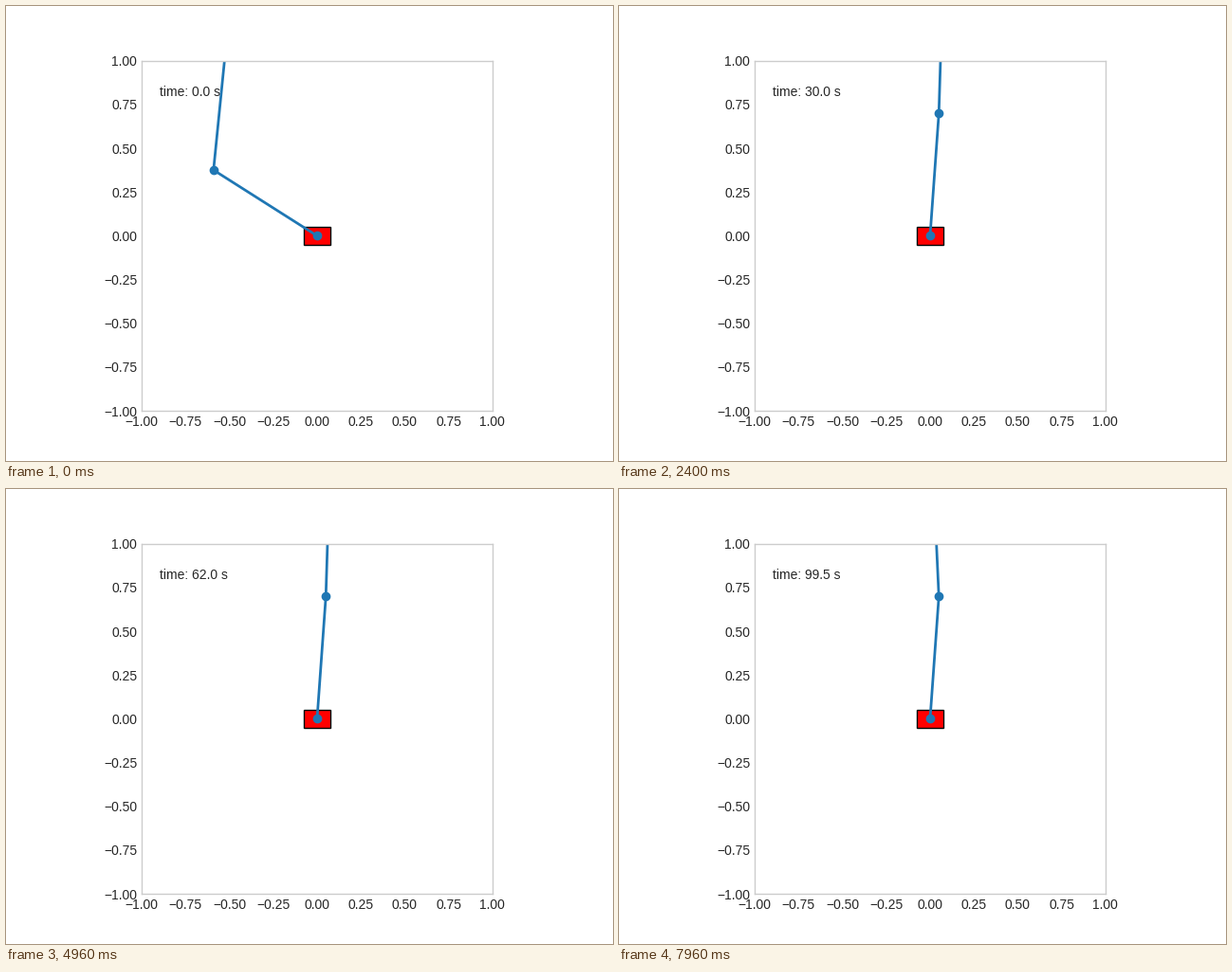
A matplotlib script that plays this animation: 640x480 px, repeating every 8 s.

```python
import numpy as np
import matplotlib.pyplot as plt
from matplotlib.animation import FuncAnimation
from matplotlib.patches import Rectangle

FRAMES, INTERVAL = 200, 40
DT = 0.5
LINK = 0.7
SETTLED = 46

plt.rcParams.update({
    "font.family": "Liberation Sans",
    "font.size": 10,
    "text.color": "0.15",
    "xtick.color": "0.15",
    "ytick.color": "0.15",
    "axes.edgecolor": "0.8",
    "axes.linewidth": 1.0,
    "xtick.major.size": 0,
    "ytick.major.size": 0,
    "lines.solid_capstyle": "round",
})

fig = plt.figure(figsize=(6.4, 4.8), dpi=100, facecolor="white")
ax = fig.add_subplot(aspect="equal", xlim=(-1, 1), ylim=(-1, 1))
ax.set_xticks(np.linspace(-1, 1, 9))
ax.set_yticks(np.linspace(-1, 1, 9))

ax.add_patch(Rectangle((-0.075, -0.05), 0.15, 0.1, fc="red", ec="black", lw=1))
arm, = ax.plot([], [], "o-", color="#1f77b4", lw=2, ms=6)
clock = ax.text(0.05, 0.9, "", transform=ax.transAxes)


def angles(i):
    """Lower joint angle from vertical, and upper joint angle relative to it."""
    lower = np.interp(i, [0, 26, 35, 42, 44, SETTLED],
                      [-1.005, 0.014, 0.344, 0.065, 0.05, 0.0715])
    if i >= SETTLED:
        # the controller chatters between two neighbouring poses
        upper = -0.0405 if i % 2 == 0 else -0.1175
    else:
        upper = np.interp(i, [0, 26, 35, 42, SETTLED],
                          [1.105, 1.105, -0.579, -0.1175, -0.0405])
    return lower, upper


def update(i):
    lower, upper = angles(i)
    heading = np.array([lower, lower + upper])
    x = np.r_[0, np.cumsum(LINK * np.sin(heading))]
    y = np.r_[0, np.cumsum(LINK * np.cos(heading))]
    arm.set_data(x, y)
    clock.set_text(f"time: {i * DT:.1f} s")
    return arm, clock


anim = FuncAnimation(fig, update, frames=FRAMES, interval=INTERVAL,
                     repeat=True, repeat_delay=0, blit=False)
plt.show()
```
